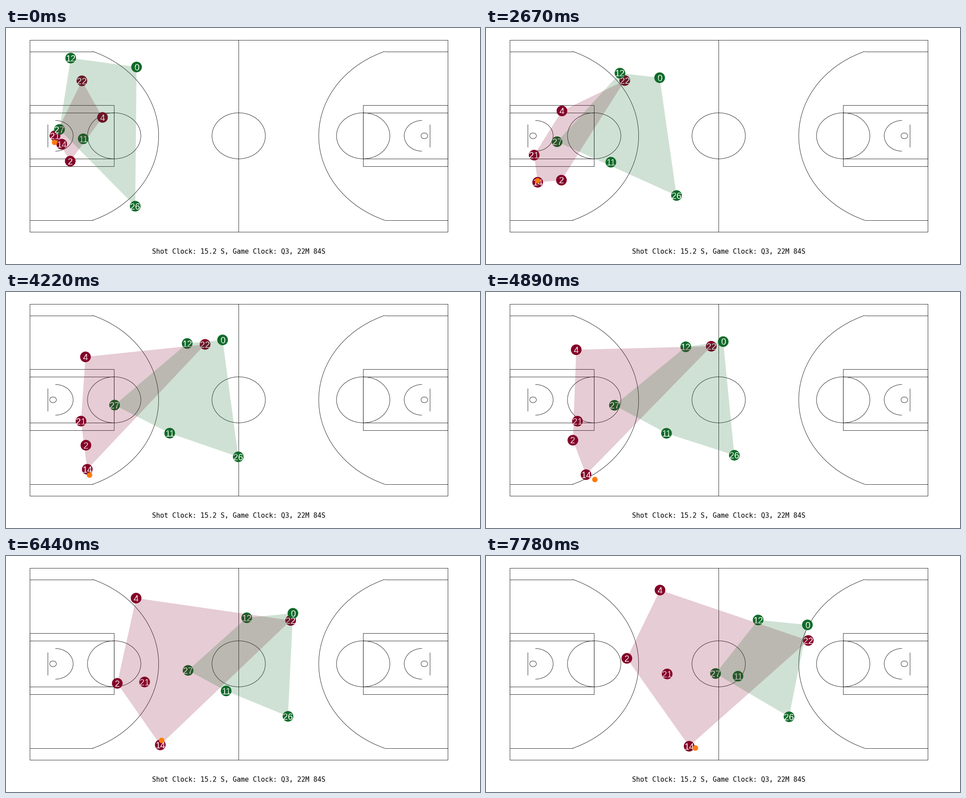
Write a matplotlib script that moves like this. It is 1058 by 529 pixels and loops after 8 s.

```python
import numpy as np
import matplotlib.pyplot as plt
from matplotlib.animation import FuncAnimation
from matplotlib.patches import Arc, Circle, Ellipse, Polygon, Rectangle

W, H, DPI = 1058, 529, 100
PT = 72 / DPI  # points per pixel
TICKS, TICK_MS = 200, 40
STEPS = 36  # distinct poses in one loop

# Court box in pixels and its scale in pixels per foot
LEFT, TOP, RIGHT, BOTTOM = 52.85, 26.8, 985.9, 456.6
FX, FY = (RIGHT - LEFT) / 94, (BOTTOM - TOP) / 50
MID_X, MID_Y = (LEFT + RIGHT) / 2, (TOP + BOTTOM) / 2

GREEN, MAROON, ORANGE = "#106b29", "#840028", "#ff7a0a"
KEY_STEPS = (0, 7, 19, 29, 35)
BALL_STEPS = (0, 7, 12, 19, 25, 29, 35)


def path(*points, steps=KEY_STEPS):
    """Smooth cubic path through the key points, one position per step."""
    points, steps = np.array(points, float), np.array(steps, float)
    slope = np.gradient(points, steps, axis=0, edge_order=2)
    t = np.arange(STEPS)
    i = np.clip(np.searchsorted(steps, t, side="right") - 1, 0, len(steps) - 2)
    h = (steps[i + 1] - steps[i])[:, None]
    s = (t - steps[i])[:, None] / h
    return ((2 * s**3 - 3 * s**2 + 1) * points[i]
            + (s**3 - 2 * s**2 + s) * h * slope[i]
            + (3 * s**2 - 2 * s**3) * points[i + 1]
            + (s**3 - s**2) * h * slope[i + 1])


def convex_hull(points):
    pts = sorted(map(tuple, points))

    def chain(seq):
        out = []
        for p in seq:
            while len(out) > 1:
                (x0, y0), (x1, y1) = out[-2:]
                if (x1 - x0) * (p[1] - y0) > (y1 - y0) * (p[0] - x0):
                    break
                out.pop()
            out.append(p)
        return out[:-1]

    return chain(pts) + chain(pts[::-1])


home = {
    22: path((169, 118), (231, 120), (444, 117), (635, 144), (719, 189)),
    4: path((215, 200), (184, 204), (177, 145), (290, 94), (388, 76)),
    21: path((109, 241), (90, 273), (167, 289), (309, 282), (404, 264)),
    14: path((124, 260), (98, 305), (181, 397), (344, 423), (453, 426)),
    2: path((143, 298), (164, 326), (178, 343), (248, 285), (314, 229)),
}
away = {
    12: path((144, 67), (227, 89), (404, 115), (537, 138), (607, 143)),
    0: path((291, 87), (334, 110), (483, 107), (640, 128), (717, 154)),
    27: path((119, 227), (123, 250), (242, 253), (406, 256), (512, 263)),
    11: path((172, 248), (225, 281), (365, 316), (491, 302), (562, 269)),
    26: path((288, 399), (361, 382), (518, 369), (629, 359), (676, 360)),
}
ball_path = path((108, 256), (90, 264), (115, 342), (186, 410), (299, 421),
                 (347, 413), (467, 430), steps=BALL_STEPS)

fig = plt.figure(figsize=(W / DPI, H / DPI), dpi=DPI, facecolor="white")
ax = fig.add_axes([0, 0, 1, 1])
ax.set_xlim(0, W)
ax.set_ylim(H, 0)
ax.axis("off")

LINE = dict(lw=0.8 * PT, color="black", zorder=1)
SHAPE = dict(lw=0.8 * PT, ec="black", fc="none", zorder=1)


def line(x0, y0, x1, y1):
    ax.plot([x0, x1], [y0, y1], solid_capstyle="butt", **LINE)


def oval(x, feet):
    ax.add_patch(Ellipse((x, MID_Y), 2 * feet * FX, 2 * feet * FY, **SHAPE))


def box(x0, y0, x1, y1):
    ax.add_patch(Rectangle((x0, y0), x1 - x0, y1 - y0, **SHAPE))


def draw_half(base, side):
    """Markings of one half; side is +1 for left and -1 for right."""
    def x(feet):
        return base + side * feet * FX

    for half_width in (8, 6):
        box(x(0), MID_Y - half_width * FY, x(19), MID_Y + half_width * FY)
    oval(x(19), 6)
    oval(x(5.25), 0.75)
    line(x(4), MID_Y - 3 * FY, x(4), MID_Y + 3 * FY)

    turn = 0 if side > 0 else 180
    ax.add_patch(Arc((x(5.78), MID_Y), 8 * FX, 8 * FY,
                     theta1=turn - 90, theta2=turn + 90, **SHAPE))

    # Three-point line: corner straights joined by an arc
    limit = np.arcsin(22 / 23.75)
    a = np.linspace(-limit, limit, 160)
    arc_x = x(5.25 + 23.75 * np.cos(a))
    arc_y = MID_Y + 23.75 * FY * np.sin(a)
    ax.plot(arc_x, arc_y, **LINE)
    for end in (0, -1):
        line(x(0), arc_y[end], arc_x[end], arc_y[end])


box(LEFT, TOP, RIGHT, BOTTOM)
line(MID_X, TOP, MID_X, BOTTOM)
oval(MID_X, 6)
draw_half(LEFT, 1)
draw_half(RIGHT, -1)

ax.text(MID_X + 0.3, 506, "Shot Clock: 15.2 S, Game Clock: Q3, 22M 84S",
        family="DejaVu Sans Mono", size=15 * PT, ha="center", va="baseline")

players, hulls = [], []
for team, color in ((home, MAROON), (away, GREEN)):
    for number, spots in team.items():
        dot = ax.add_patch(Circle((0, 0), 11.9, fc=color, lw=0, zorder=2))
        label = ax.text(0, 0, str(number), family="Liberation Sans",
                        size=20 * PT, color="white", ha="center",
                        va="baseline", zorder=3)
        players.append((dot, label, spots + 0.4))
    area = ax.add_patch(Polygon([(0, 0), (1, 0), (0, 1)], fc=color, lw=0,
                                alpha=0.2, zorder=4))
    hulls.append((area, np.array(list(team.values())) + 0.4))
ball = ax.add_patch(Circle((0, 0), 6.1, fc=ORANGE, lw=0, zorder=5))


def update(tick):
    # The pose reached by the end of this tick, held until the next step
    k = ((tick + 1) * STEPS - 1) // TICKS
    for dot, label, spots in players:
        x, y = spots[k]
        dot.center = x, y
        label.set_position((x, y + 7.2))
    for area, spots in hulls:
        area.set_xy(convex_hull(spots[:, k]))
    ball.center = tuple(ball_path[k] + 0.4)
    return []


anim = FuncAnimation(fig, update, frames=TICKS, interval=TICK_MS,
                     init_func=lambda: update(0), repeat=True, repeat_delay=0)
plt.show()
```
